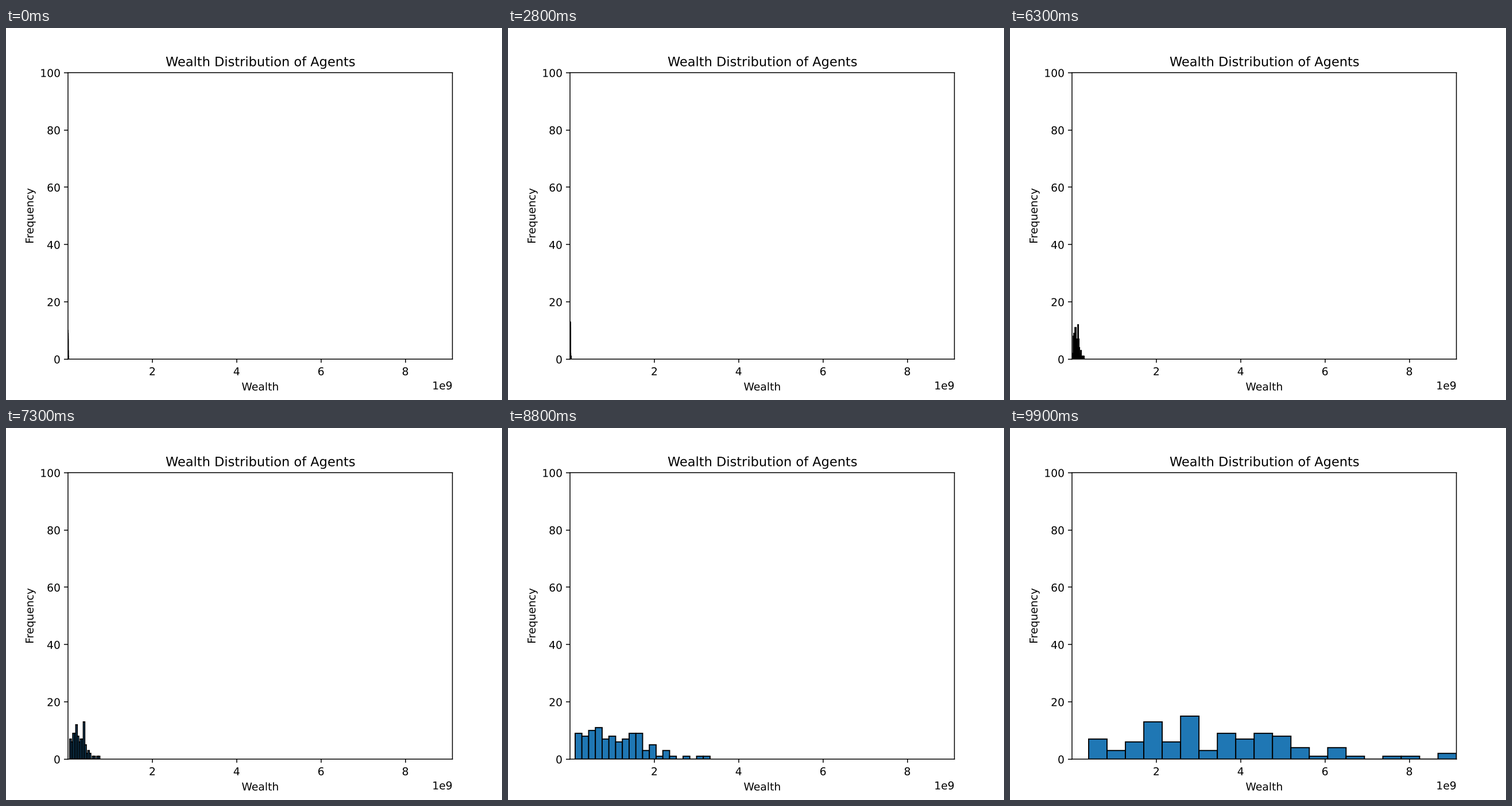
These frames come from a looping animation (864 by 648 pixels, 10000 ms). A matplotlib script:

```python
import numpy as np
import matplotlib.pyplot as plt
from matplotlib import patheffects
from matplotlib.animation import FuncAnimation

FRAMES, INTERVAL = 100, 100
AGENTS, BINS = 100, 20
BILLION = 1e9

# Poorest and richest agent in billions, growing exponentially between steps
STEPS = [0, 44, 63, 80, 88, 99]
POOREST = [.0002, .004, .0155, .0817, .1225, .395]
RICHEST = [.004, .056, .288, 1.484, 3.322, 9.117]

# Share of agents below a position in the range from poorest to richest
SHARE = [0, .13, .49, .65, .87, .96, 1]
POSITION = [0, .1, .28, .41, .52, .7, 1]

rng = np.random.default_rng(4)
rank = np.interp(np.linspace(0, 1, AGENTS), SHARE, POSITION)
phase = rng.uniform(0, 2 * np.pi, AGENTS)
speed = rng.uniform(.15, .4, AGENTS)


def grow(values, step):
    return BILLION * np.exp(np.interp(step, STEPS, np.log(values)))


def histogram(step):
    """Let the agents drift around their rank and count them."""
    pos = rank + .025 * np.sin(phase + speed * step)
    pos = (pos - pos.min()) / np.ptp(pos)
    counts, _ = np.histogram(pos, bins=BINS, range=(0, 1))
    edges = np.linspace(grow(POOREST, step), grow(RICHEST, step), BINS + 1)
    return counts, edges


# Unhinted text and unsnapped lines keep subpixel positions
plt.rcParams["path.snap"] = False
plt.rcParams["path.effects"] = [patheffects.Normal()]

fig, ax = plt.subplots(figsize=(6.4, 4.8), dpi=135)
ax.set_title("Wealth Distribution of Agents")
ax.set_xlabel("Wealth")
ax.set_ylabel("Frequency")
bars = ax.bar(np.zeros(BINS), np.zeros(BINS), align="edge",
              color="tab:blue", edgecolor="black")
ax.set_xlim(POOREST[0] * BILLION, RICHEST[-1] * BILLION)
ax.set_ylim(0, 100)


def update(step):
    counts, edges = histogram(step)
    for bar, count, left, width in zip(bars, counts, edges, np.diff(edges)):
        bar.set_bounds(left, 0, width, count)
    return bars.patches


anim = FuncAnimation(fig, update, frames=FRAMES, interval=INTERVAL,
                     init_func=lambda: update(0), repeat=True, repeat_delay=0)
plt.show()
```
